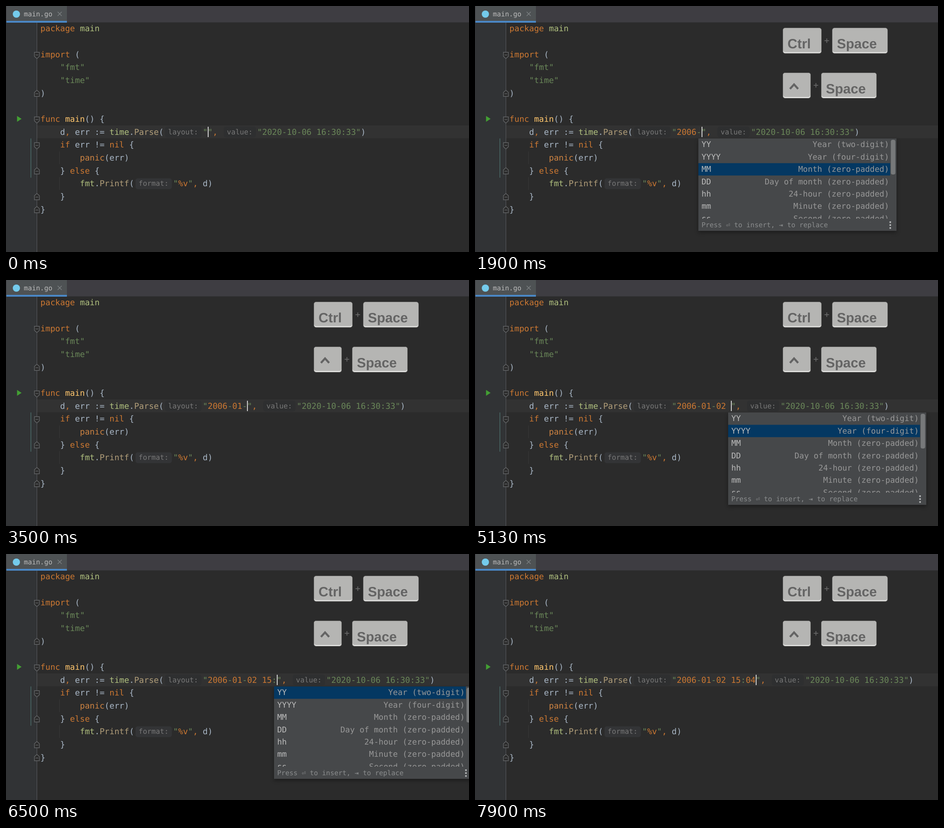
Recreate the animation shown at these times as an HTML page with a canvas. Size 1026 by 546 pixels, loop 8000 ms.

```html
<!DOCTYPE html>
<html lang="en">
<head>
<meta charset="utf-8">
<title>Date layout completion</title>
<style>
  html, body { margin: 0; width: 100%; height: 100%; overflow: hidden; background: #2b2b2b; }
  canvas { display: block; }
</style>
</head>
<body>
<canvas id="stage" width="1026" height="546"></canvas>
<script>
const ctx = document.getElementById('stage').getContext('2d', { alpha: false });
const LOOP = 8000;
const MONO = '"DejaVu Sans Mono", monospace';
const ADVANCE = 0.602;
const CODE = 18.15, HINT = 15.8, LIST = 17.6, SMALL = 15;
const LEFT = 76.3, BASE = 56.3, PITCH = 28.68;
const C = {
  plain: '#a9b7c6', keyword: '#cc7832', string: '#6a8759', pkg: '#afbf7e',
  func: '#ffc66d', call: '#b09d79', builtin: '#cc8242', hint: '#787878'
};

// Each entry changes part of the state from its time on.
const timeline = [
  [0, { keys: 0, text: '', lit: 0, row: -1, scroll: 0, caret: true }],
  [300, { keys: 0.4 }], [380, { keys: 0.75 }], [460, { keys: 1, row: 0 }],
  [800, { row: 1 }], [1100, { row: -1 }],
  [1130, { text: '2006' }], [1300, { lit: 4 }],
  [1460, { text: '2006-' }], [1530, { row: 0, lit: 5 }],
  [1730, { row: 1 }], [1860, { row: 2 }], [2200, { row: -1 }],
  [2230, { text: '2006-01' }], [2400, { lit: 7 }],
  [2600, { text: '2006-01-' }], [2730, { lit: 8 }], [2800, { row: 0 }],
  [3030, { row: 1 }], [3130, { row: 2 }], [3260, { row: 3 }], [3500, { row: -1 }],
  [3530, { text: '2006-01-02' }], [3700, { lit: 10 }],
  [3960, { caret: false }], [4260, { text: '2006-01-02 ', lit: 11, caret: true }],
  [4760, { row: 0 }], [5060, { row: 1 }], [5230, { row: 2 }], [5260, { row: 3 }],
  [5330, { row: 4 }], [5560, { row: -1 }],
  [5630, { text: '2006-01-02 15' }], [5800, { lit: 13 }],
  [6100, { text: '2006-01-02 15:' }], [6300, { lit: 14 }], [6500, { row: 0 }],
  [6800, { row: 1 }], [6860, { row: 2 }], [6900, { row: 3 }], [6960, { row: 4 }],
  [7030, { row: 5 }], [7100, { row: 6, scroll: 14 }], [7330, { row: 5 }],
  [7660, { row: -1 }], [7730, { text: '2006-01-02 15:04' }], [7900, { lit: 16 }]
];

const choices = [
  ['YY', 'Year (two-digit)'], ['YYYY', 'Year (four-digit)'],
  ['MM', 'Month (zero-padded)'], ['DD', 'Day of month (zero-padded)'],
  ['hh', '24-hour (zero-padded)'], ['mm', 'Minute (zero-padded)'],
  ['ss', 'Second (zero-padded)']
];

function stateAt(t) {
  const state = {};
  for (const [start, change] of timeline) if (start <= t) Object.assign(state, change);
  return state;
}

function rect(x, y, w, h, color) {
  ctx.fillStyle = color;
  ctx.fillRect(x, y, w, h);
}

function roundRect(x, y, w, h, r, color) {
  ctx.fillStyle = color;
  ctx.beginPath();
  ctx.roundRect(x, y, w, h, r);
  ctx.fill();
}

function path(points, color, width, close) {
  ctx.beginPath();
  points.forEach(([x, y]) => ctx.lineTo(x, y));
  if (close) ctx.closePath();
  ctx.strokeStyle = color;
  ctx.lineWidth = width;
  ctx.stroke();
}

// Draws on a monospace grid and returns the x after the last character.
function mono(text, x, y, color, size = CODE) {
  ctx.font = `${size}px ${MONO}`;
  ctx.fillStyle = color;
  for (const ch of text) {
    if (ch !== ' ') ctx.fillText(ch, x, y);
    x += size * ADVANCE;
  }
  return x;
}

function hint(label, x, y, fill) {
  const w = label.length * HINT * ADVANCE;
  roundRect(x + 3, y - 18, w + 14, 24, 5, fill);
  mono(label, x + 9.8, y - 1, C.hint, HINT);
  return x + w + 20;
}

// Parts alternate between a colour name and its text.
function code(line, indent, ...parts) {
  const y = BASE + line * PITCH;
  let x = LEFT + indent * CODE * ADVANCE;
  for (let i = 0; i < parts.length; i += 2) {
    x = parts[i] === 'hint' ? hint(parts[i + 1], x, y, '#333436')
                            : mono(parts[i + 1], x, y, C[parts[i]]);
  }
  return x;
}

function fold(line, opening) {
  const y = BASE + line * PITCH - 5, d = opening ? 1 : -1;
  const shape = [[63, y - 6 * d], [74, y - 6 * d], [74, y + 3 * d], [68.5, y + 8 * d], [63, y + 3 * d]];
  ctx.fillStyle = '#2b2b2b';
  ctx.beginPath();
  shape.forEach(([px, py]) => ctx.lineTo(px, py));
  ctx.fill();
  path(shape, '#6c6e70', 1.2, true);
  path([[65.5, y], [71.5, y]], '#6c6e70', 1.2);
}

function drawFrame() {
  rect(0, 0, 1026, 546, '#2b2b2b');
  rect(0, 37, 68, 509, '#313335');
  rect(69, 265, 957, 28.5, '#323232');
  rect(0, 0, 1026, 36, '#3e3d42');
  rect(0, 36, 1026, 1, '#323234');
  rect(1, 0, 134, 33, '#4e5254');
  rect(1, 33, 134, 4, '#4a88c7');
  ctx.fillStyle = '#74cbec';
  ctx.beginPath();
  ctx.arc(23, 18, 8, 0, 7);
  ctx.fill();
  mono('main.go', 39.5, 23, '#bbbbbb', SMALL);
  path([[114.5, 13], [123.5, 22]], '#7f8385', 1.3);
  path([[123.5, 13], [114.5, 22]], '#7f8385', 1.3);

  rect(68, 37, 1, 509, '#5a5c5e');
  rect(54.5, 294, 1.5, 87, '#4a6b68');
  rect(118, 323, 1, 28, '#393939');
  rect(118, 380, 1, 28, '#393939');
  [2, 7, 9].forEach(line => fold(line, true));
  [5, 11, 13, 14].forEach(line => fold(line, false));
  ctx.fillStyle = '#43a033';
  ctx.beginPath();
  [[24.5, 244], [34.5, 250.5], [24.5, 257]].forEach(([x, y]) => ctx.lineTo(x, y));
  ctx.fill();
}

function drawCode() {
  code(0, 0, 'keyword', 'package ', 'pkg', 'main');
  code(2, 0, 'keyword', 'import ', 'plain', '(');
  code(3, 4, 'string', '"fmt"');
  code(4, 4, 'string', '"time"');
  code(5, 0, 'plain', ')');
  code(7, 0, 'keyword', 'func ', 'func', 'main', 'plain', '() {');
  code(9, 4, 'keyword', 'if ', 'plain', 'err != ', 'keyword', 'nil ', 'plain', '{');
  code(10, 8, 'builtin', 'panic', 'plain', '(err)');
  code(11, 4, 'plain', '} ', 'keyword', 'else ', 'plain', '{');
  code(12, 8, 'pkg', 'fmt', 'plain', '.', 'call', 'Printf', 'plain', '(', 'hint', 'format:',
    'string', '"', 'keyword', '%v', 'string', '"', 'keyword', ', ', 'plain', 'd)');
  code(13, 4, 'plain', '}');
  code(14, 0, 'plain', '}');
}

function drawParseLine({ text, lit, caret }) {
  const y = BASE + 8 * PITCH, fill = '#2e2f30';
  let x = code(8, 4, 'plain', 'd', 'keyword', ', ', 'plain', 'err := ', 'pkg', 'time',
    'plain', '.', 'call', 'Parse', 'plain', '(');
  x = hint('layout:', x, y, fill);
  x = mono('"', x, y, C.string);
  [...text].forEach((ch, i) => {
    const orange = /\d/.test(ch) === i < lit;
    x = mono(ch, x, y, orange ? C.keyword : C.string);
  });
  const caretX = x;
  x = mono('"', x, y, C.string);
  x = mono(', ', x, y, C.keyword);
  x = hint('value:', x, y, fill);
  x = mono('"2020-10-06 16:30:33"', x, y, C.string);
  mono(')', x, y, C.plain);
  if (caret) rect(Math.round(caretX), 268, 2, 23, '#cfcfcf');
  return caretX;
}

function drawPopup(caretX, row, scroll) {
  const x = Math.round(caretX - 6.4), top = 294, pitch = 27.4;
  ctx.save();
  ctx.shadowColor = 'rgba(0,0,0,0.35)';
  ctx.shadowBlur = 8;
  ctx.shadowOffsetY = 4;
  rect(x, top, 439, 205, '#46484a');
  ctx.restore();

  ctx.save();
  ctx.beginPath();
  ctx.rect(x, top, 439, 178);
  ctx.clip();
  choices.forEach(([name, about], i) => {
    const y = top + i * pitch - scroll;
    if (i === row) rect(x, y, 425, pitch, '#043862');
    mono(name, x + 7, y + 19.4, '#bbbbbb', LIST);
    mono(about, x + 422.5 - about.length * LIST * ADVANCE, y + 19.4, '#989898', LIST);
  });
  ctx.restore();

  roundRect(x + 426.5, 297 + scroll * 0.43, 10, 77, 4, '#77797a');
  mono('Press ⏎ to insert, ⇥ to replace', x + 7, 491, '#8b8d8e', SMALL);
  for (const y of [478, 484.5, 491]) rect(x + 423.5, y, 3.5, 3.5, '#b4b6b7');
}

function keycap(x, y, w, label) {
  roundRect(x, y, w, 57, 5, '#858583');
  roundRect(x + 1, y + 1, w - 2, 55, 4.5, '#ececea');
  roundRect(x + 1, y + 1, w - 2, 53, 4.5, '#b5b5b3');
  ctx.font = 'bold 30px "Liberation Sans", Arial, sans-serif';
  ctx.fillStyle = '#646464';
  ctx.fillText(label, x + 10.5, y + 45.5);
}

function plus(x, y) {
  path([[x - 5, y], [x + 5, y]], '#686868', 1.7);
  path([[x, y - 5], [x, y + 5]], '#686868', 1.7);
}

function drawKeys(alpha) {
  ctx.save();
  ctx.globalAlpha = alpha;
  keycap(682, 48.5, 86, 'Ctrl');
  plus(779.5, 77);
  keycap(791.5, 48.5, 123, 'Space');
  keycap(682, 148, 62, '');
  path([[698, 184], [707, 174], [716, 184]], '#646464', 4.5);
  plus(755.5, 176);
  keycap(767, 148, 123, 'Space');
  ctx.restore();
}

function render() {
  const state = stateAt(performance.now() % LOOP);
  ctx.textRendering = 'geometricPrecision';
  drawFrame();
  drawCode();
  const caretX = drawParseLine(state);
  if (state.keys) drawKeys(state.keys);
  if (state.row >= 0) drawPopup(caretX, state.row, state.scroll);
  requestAnimationFrame(render);
}
render();
</script>
</body>
</html>
```
